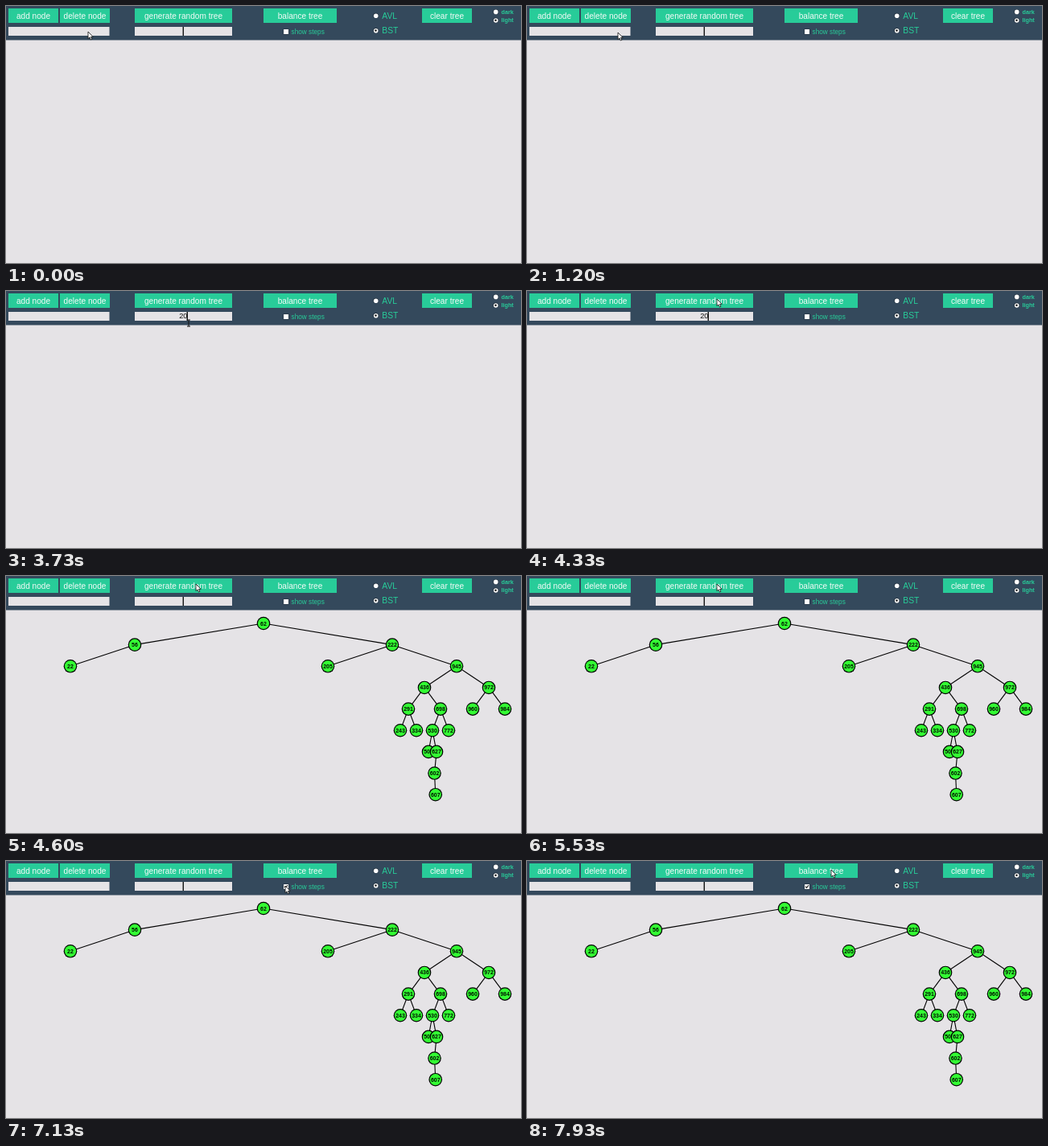
An HTML page with a canvas that plays this animation: 640x320 px, repeating every 8000 ms.

```html
<!DOCTYPE html>
<html lang="en">
<head>
<meta charset="utf-8">
<title>Tree builder</title>
<style>
  html, body { margin: 0; width: 100%; height: 100%; overflow: hidden; background: #e5e3e6; }
  canvas { display: block; }
</style>
</head>
<body>
<canvas id="stage" width="640" height="320"></canvas>
<script>
const ctx = document.getElementById('stage').getContext('2d');
const LOOP = 8000;
const PAPER = '#e5e3e6', BAR = '#34495c', GREEN = '#28cc99', NODE = '#33fb33';

const BUTTONS = [
  ['add node', 3, 62], ['delete node', 67, 62], ['generate random tree', 160, 121],
  ['balance tree', 320, 91], ['clear tree', 517, 62]
];

// Insertion order of the search tree
const VALUES = [62, 56, 222, 22, 205, 945, 436, 972, 291, 698, 960, 984,
  243, 334, 530, 772, 507, 627, 602, 607];

// Pointer stops: time, x, y
const PATH = [
  [0, 102, 32], [150, 102, 32], [800, 113, 33], [1250, 113, 33], [1800, 211, 29],
  [1900, 211, 29], [2350, 227, 40], [3760, 227, 40], [4280, 236, 10], [5700, 236, 10],
  [6350, 311, 20], [6420, 311, 20], [6800, 347, 31], [7250, 347, 31],
  [7800, 378, 12], [7930, 378, 11], [LOOP, 378, 11]
];
const IBEAM = [2000, 3800], TYPE_2 = 2950, TYPE_0 = 3150, GENERATE = 4460, CHECK = 7000;

function buildTree(values) {
  const nodes = [];
  for (const value of values) {
    let parent = null, next = nodes[0], x = 320, depth = 0;
    while (next) {
      parent = next;
      const side = value < parent.value ? 'left' : 'right';
      depth++;
      x = parent.x + (side === 'left' ? -1 : 1) * 320 / 2 ** depth;
      next = parent[side];
      if (!next) parent.slot = side;
    }
    const node = { value, parent, x, y: 59 + depth * 26.65 };
    if (parent) parent[parent.slot] = node;
    nodes.push(node);
  }
  return nodes;
}
const tree = buildTree(VALUES);

function rect(x, y, w, h, color) {
  ctx.fillStyle = color;
  ctx.fillRect(x, y, w, h);
}

function label(text, x, y, size, color, align = 'left', weight = '') {
  ctx.font = `${weight} ${size}px "Liberation Sans", Arial, sans-serif`;
  ctx.textAlign = align;
  ctx.fillStyle = color;
  ctx.fillText(text, x, y);
}

function disc(x, y, r, color) {
  ctx.beginPath();
  ctx.arc(x, y, r, 0, 2 * Math.PI);
  ctx.fillStyle = color;
  ctx.fill();
}

function polyline(points, color, width) {
  ctx.beginPath();
  for (const [x, y] of points) ctx.lineTo(x, y);
  ctx.strokeStyle = color;
  ctx.lineWidth = width;
  ctx.stroke();
}

function radio(x, y, selected) {
  disc(x, y, 3.3, '#22303d');
  disc(x + 0.2, y + 0.2, 2.8, '#fff');
  if (selected) disc(x, y, 1.3, '#222');
}

function drawToolbar(t) {
  rect(0, 0, 640, 42.5, BAR);
  for (const [text, x, w] of BUTTONS) {
    rect(x, 3, w, 18, GREEN);
    label(text, x + w / 2, 15.6, 10.1, '#f4fbf8', 'center');
  }

  rect(3, 26, 125.5, 11, PAPER);
  rect(160, 26, 121, 11, PAPER);
  const typed = t < TYPE_2 || t >= GENERATE ? '' : t < TYPE_0 ? '2' : '20';
  label(typed, 220.3, 34.4, 9.2, '#111', 'center');
  const phase = t % 900;
  if (phase < 320 || phase >= 600) rect(219.6 + typed.length * 2.5, 26, 1.3, 11, '#000');

  rect(344.5, 28.5, 7, 7, '#22303d');
  rect(345, 29, 6, 6, '#fff');
  if (t >= CHECK) polyline([[346, 31.6], [347.5, 33.4], [350, 30.2]], '#222', 1.1);
  label('show steps', 354.5, 34.7, 8.25, GREEN);

  radio(459.5, 12, false);
  label('AVL', 467.3, 15.7, 10.3, GREEN);
  radio(459.5, 30.5, true);
  label('BST', 467.3, 34.2, 10.3, GREEN);
  radio(608.5, 7.2, false);
  label('dark', 615.5, 9.8, 7.2, GREEN, 'left', 'bold');
  radio(608.5, 17.8, true);
  label('light', 615.5, 20.2, 7.2, GREEN, 'left', 'bold');
}

function drawTree() {
  for (const { x, y, parent } of tree) {
    if (parent) polyline([[parent.x, parent.y], [x, y]], '#000', 1.1);
  }
  for (const { x, y, value } of tree) {
    disc(x, y, 8.3, '#000');
    disc(x, y, 7.1, NODE);
    label(value, x, y + 2.5, 7, '#001500', 'center', 'bold');
  }
}

function pointerAt(t) {
  const i = PATH.findIndex(stop => stop[0] > t);
  const [t0, x0, y0] = PATH[i - 1], [t1, x1, y1] = PATH[i];
  const u = (t - t0) / (t1 - t0), k = u * u * (3 - 2 * u);
  return [x0 + (x1 - x0) * k, y0 + (y1 - y0) * k];
}

function drawPointer(t) {
  const [x, y] = pointerAt(t);
  ctx.save();
  ctx.translate(x, y);
  if (t >= IBEAM[0] && t < IBEAM[1]) {
    polyline([[-2, -4], [2, -4]], '#111', 1);
    polyline([[0, -4], [0, 4]], '#111', 1);
    polyline([[-2, 4], [2, 4]], '#111', 1);
  } else {
    const arrow = new Path2D('M0 0V8.6L2 6.9L3.4 10L4.9 9.3L3.5 6.3H6.2Z');
    ctx.fillStyle = '#fff';
    ctx.strokeStyle = '#111';
    ctx.lineWidth = 0.8;
    ctx.fill(arrow);
    ctx.stroke(arrow);
  }
  ctx.restore();
}

function frame() {
  const t = performance.now() % LOOP;
  rect(0, 0, 640, 320, PAPER);
  drawToolbar(t);
  if (t >= GENERATE) drawTree();
  drawPointer(t);
  requestAnimationFrame(frame);
}
frame();
</script>
</body>
</html>
```
